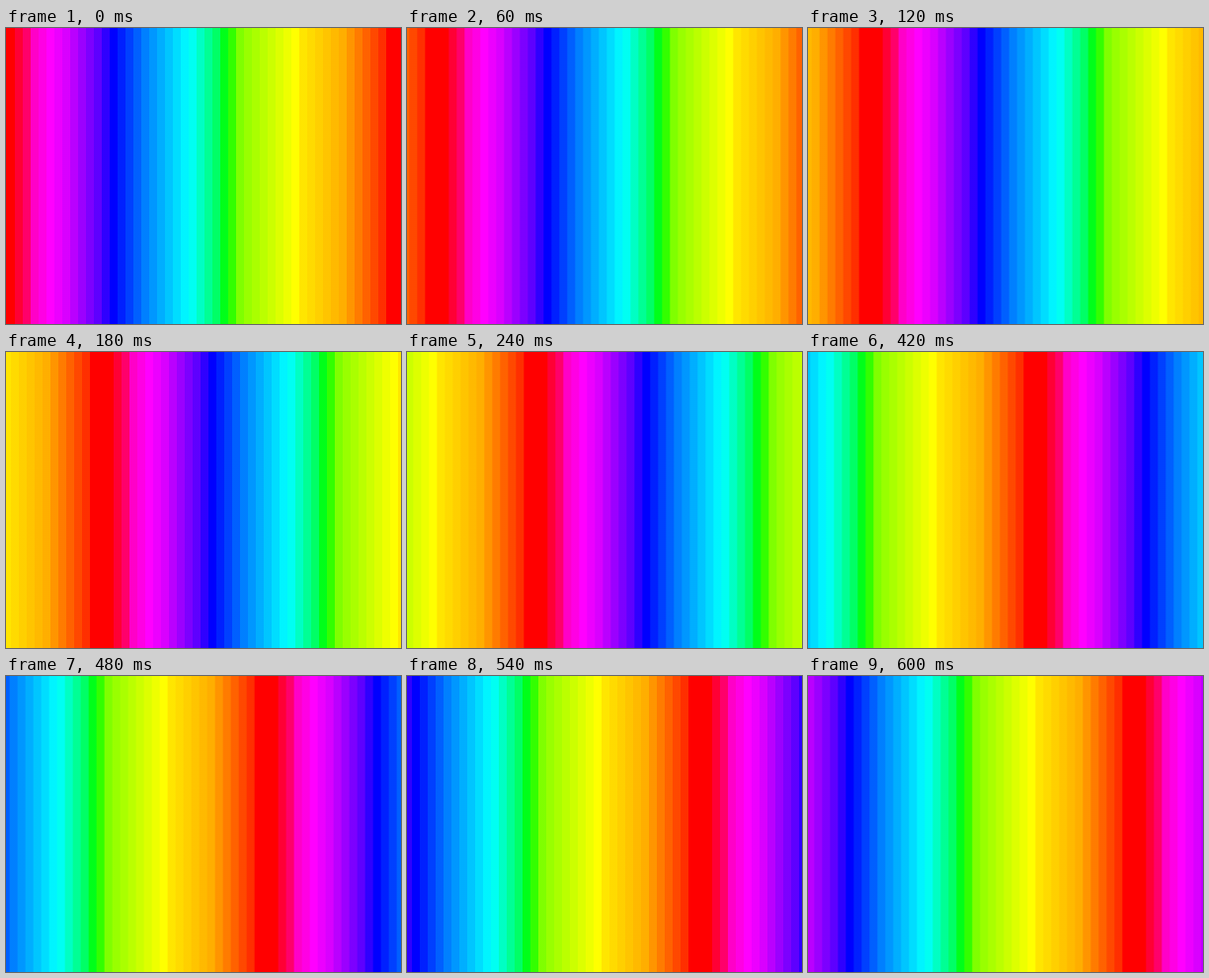
Animation of 400x300 px, one loop 660 ms. Source, as an HTML page:

```html
<!DOCTYPE html>
<html lang="en">
<head>
<meta charset="utf-8">
<title>Rainbow bands</title>
<style>
  html, body { margin: 0; width: 100%; height: 100%; overflow: hidden; }
  #bands {
    width: 400px;
    height: 300px;
    background-size: 400px 300px;
    background-repeat: repeat;
    animation: slide 660ms steps(11) infinite;
  }
  /* Eleven of twelve steps around the wheel, then a hard jump back. */
  @keyframes slide {
    from { background-position: 1px 0; }
    to { background-position: 367.667px 0; }
  }
</style>
</head>
<body>
<div id="bands"></div>
<script>
  const COUNT = 50;
  const WIDTH = 400 / COUNT;

  // [band, hue]: the hue runs straight from each point to the next.
  const keys = [
    [0, 360], [2, 335], [3, 313], [5, 300],
    [7, 291], [11, 262], [13, 240],
    [17, 210], [23, 177],
    [26, 144], [27, 126], [29, 90], [30, 84],
    [36, 60], [37, 54], [42, 41], [47, 11], [48, 0], [50, 0]
  ];

  function hueAt(band) {
    const next = keys.findIndex(([end]) => end > band);
    const [a, from] = keys[next - 1];
    const [b, to] = keys[next];
    return from + (to - from) * (band - a) / (b - a);
  }

  const stops = Array.from({ length: COUNT }, (_, i) =>
    `hsl(${hueAt(i)} 100% 50%) ${i * WIDTH}px ${(i + 1) * WIDTH}px`);

  document.getElementById('bands').style.backgroundImage =
    `linear-gradient(90deg, ${stops.join(', ')})`;
</script>
</body>
</html>
```
